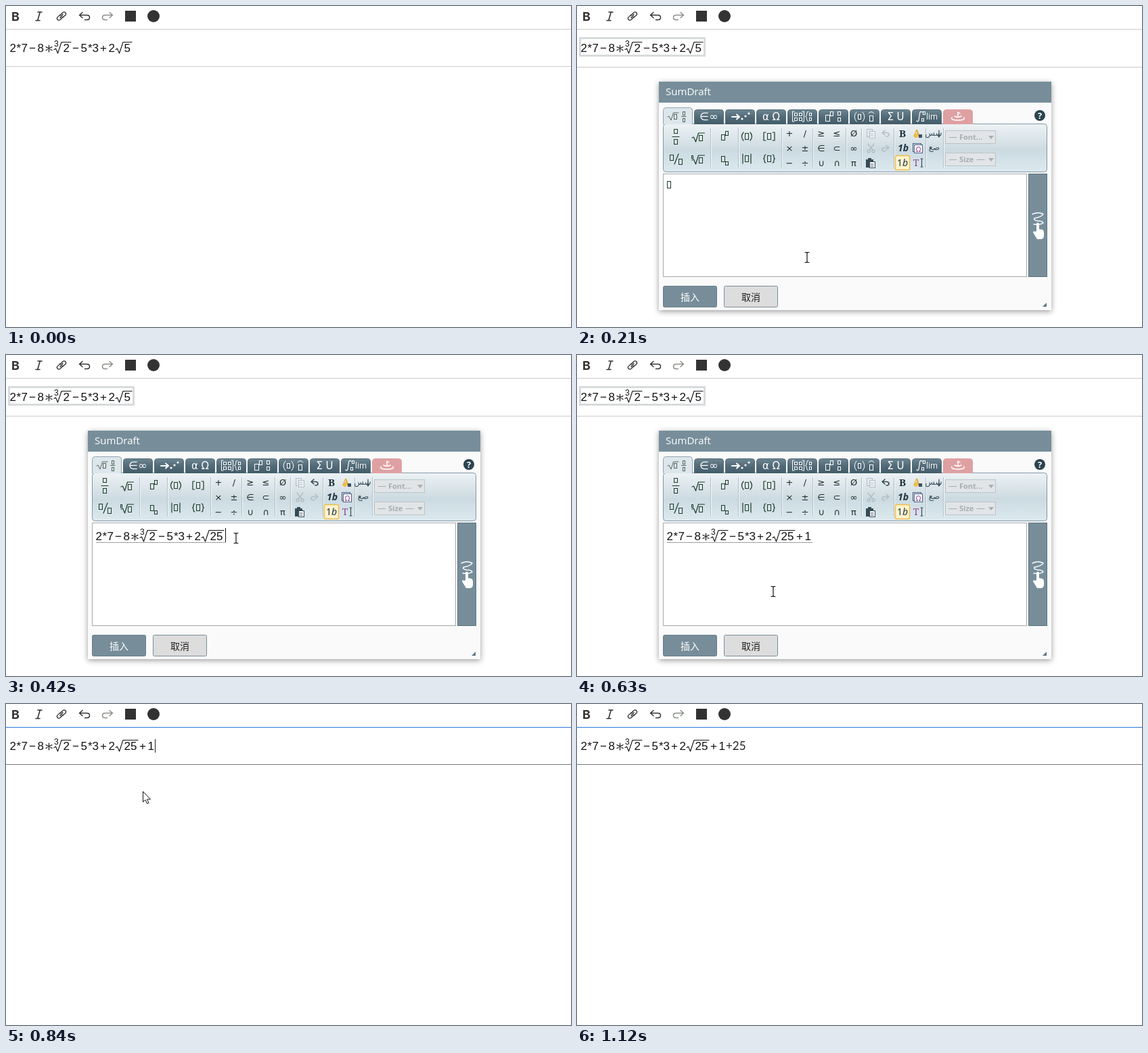
An HTML page that plays this animation: 835 by 475 pixels, repeating every 1190 ms.

```html
<!DOCTYPE html>
<html lang="en">
<head>
<meta charset="utf-8">
<title>Formula editor</title>
<style>
  html, body { margin: 0; width: 100%; height: 100%; overflow: hidden; background: #fff; }
  svg { display: block; width: 835px; height: 475px; }
  text { white-space: pre; }
  .line { fill: none; stroke-linecap: round; stroke-linejoin: round; }
  .math { font: 17px "Liberation Sans", Arial, sans-serif; fill: #111; }
  .sym { font-family: "DejaVu Sans", sans-serif; text-anchor: middle; }
  .ui { font-family: "Open Sans", sans-serif; }
  .cjk { font: 14px "Noto Sans CJK SC", "Noto Sans CJK", sans-serif; text-anchor: middle; }
</style>
</head>
<body>
<svg id="stage" viewBox="0 0 835 475" xmlns="http://www.w3.org/2000/svg"></svg>
<script>
const STEP = 70, STEPS = 17;
const stage = document.getElementById('stage');

// Markup helpers
const rect = (x, y, w, h, fill, extra = '') =>
  `<rect x="${x}" y="${y}" width="${w}" height="${h}" fill="${fill}" ${extra}/>`;
const frame = (x, y, w, h, stroke, fill = 'none', extra = '') =>
  rect(x + .5, y + .5, w - 1, h - 1, fill, `stroke="${stroke}" ${extra}`);
const line = (d, stroke = '#333', width = 1) =>
  `<path class="line" d="${d}" stroke="${stroke}" stroke-width="${width}"/>`;
const shape = (d, fill, stroke = 'none') => `<path d="${d}" fill="${fill}" stroke="${stroke}"/>`;
const text = (x, y, s, cls, size, fill, extra = '') =>
  `<text x="${x}" y="${y}" class="${cls}" font-size="${size}" fill="${fill}" ${extra}>${s}</text>`;
const sym = (x, y, s, size = 13, fill = '#1d2b24', extra = '') => text(x, y, s, 'sym', size, fill, extra);
const group = (id, content) => `<g id="${id}">${content}</g>`;
const move = (x, y, content) => `<g transform="translate(${x} ${y})">${content}</g>`;

const INK = '#1d3b28', SLATE = '#778e9a';
const box = (x, y, w = 5, h = 8, color = INK) => frame(x, y, w + 1, h + 1, color);

function toolbar() {
  const arrow = 'M4.5 0L0 4L4.5 8M.5 4H11Q15 4 15 7.5T11 11H8';
  return text(8, 21.5, 'B', '', 18, '#333', 'font-family="Inter, sans-serif" font-weight="700"') +
    line('M47 9H53M44 21.5H50M50.3 9L46.7 21.5', '#333', 1.6) +
    line('M80 14L83 10.5Q86 7.5 88 10T86 15L84 17M84 16L81 19.5Q78 22.5 76 20T78 15L80 13M80 17.5L84 12.5', '#333', 1.4) +
    move(108.5, 9.5, line(arrow, '#333', 1.5)) +
    `<g transform="translate(157.5 9.5) scale(-1 1)">${line(arrow, '#8a9088', 1.5)}</g>` +
    rect(176, 7, 16, 16, '#333') + '<circle cx="218" cy="15" r="9" fill="#333"/>';
}

function tabs() {
  const w = '#fff', icons = [
    line('M134 164l2-1l3 6l3.5-11H150', '#52665c') + box(143, 160, 4, 7, '#52665c') +
      box(156, 156, 3, 5, '#52665c') + line('M154.5 163.5H161', '#52665c') + box(156, 166, 3, 5, '#52665c'),
    sym(195, 169, '∈∞', 16, w),
    line('M229 164H239M236 160.5L240 164L236 167.5', w, 2) +
      [[244, 167], [249, 163], [254, 159]].map(([x, y]) => `<circle cx="${x}" cy="${y}" r="1.6" fill="#fff"/>`).join(''),
    sym(287, 169, 'α Ω', 15, w),
    line('M321 156H318.5V171H321M333 156H335.5V171H333M342 156Q339.5 156 339.5 160T337.5 163.5Q339.5 163.5 339.5 167T342 171', w) +
      [321, 328].map(x => box(x, 158, 4, 4, w) + box(x, 165, 4, 4, w)).join('') + box(343, 158, 3, 4, w) + box(343, 165, 3, 4, w),
    box(367, 161, 6, 9, w) + box(374, 156, 4, 6, w) + box(385, 156, 4, 5, w) + box(385, 165, 4, 5, w),
    line('M413 157Q407 164 413 171M422 157Q428 164 422 171M431 159Q435 154 439 159', w) + box(415, 160, 4, 7, w) + box(432, 162, 5, 8, w),
    sym(471, 169, 'Σ U', 15, w),
    line('M510 157Q507 155 506.5 159L505 169Q504 172 502 170', w, 1.2) + box(511, 156, 3, 4, w) + box(509, 166, 3, 4, w) +
      text(516, 168, 'lim', 'ui', 12, w),
    line('M554 165Q552 169 563 169T572 165M558 163Q563 166 568 163M563 163V157L566 159', w, 1.5)
  ];
  return icons.map((icon, i) => {
    const x = 127 + 46 * i, fill = i === 0 ? '#dce6eb' : i === 9 ? '#dfa0a2' : 'url(#tab)';
    const edge = i === 0 ? '#91a4ae' : i === 9 ? '#dfa0a2' : '#526b78';
    const top = i === 0 ? 150.5 : 153.5;
    return shape(`M${x + .5} 175V${top + 4}q0-4 4-4H${x + 39.5}q4 0 4 4V175`, fill, edge) + icon;
  }).join('');
}

function structures() {
  const root = (x, y) => line(`M${x} ${y}l2.5-1l3 7l4-13h9`, INK, 1.2) + box(x + 10, y - 4, 5, 8);
  const fences = (x, y, d) => box(x - 3, y - 5, 5, 9) + line(`M${x} ${y}${d}`, INK, 1.2);
  return box(143, 182, 5, 6) + line('M141 193.5H151', INK) + box(143, 197, 5, 7) +
    box(137, 220, 5, 8) + line('M144 234L150 219', INK, 1.2) + box(150, 226, 5, 8) +
    root(170, 195) + root(170, 228) + box(169, 221, 2, 4) +
    box(213, 190, 5, 8) + box(219, 185, 4, 6) + box(213, 222, 5, 8) + box(219, 230, 4, 5) +
    fences(251, 193, 'm-5-6q-5 6 0 12m10-12q5 6 0 12') +
    fences(284, 193, 'm-5-6h-3v12h3m10-12h3v12h-3') +
    fences(251, 226, 'm-6-7v14m12-14v14') +
    fences(284, 226, 'm-5-6q-2 0-2 3t-1.5 3q1.5 0 1.5 3t2 3m10-12q2 0 2 3t1.5 3q-1.5 0-1.5 3t-2 3');
}

function symbols() {
  const columns = { 314: '+×−', 337: '/±÷', 361: '≥∈∪', 384: '≤⊂∩', 409: 'Ø∞π' };
  return Object.entries(columns).map(([x, chars]) =>
    [...chars].map((c, i) => sym(x, [193, 215, 237][i], c)).join('')).join('');
}

function editTools() {
  const dim = '#b2bec4', dark = '#354b57';
  const bold = 'font-weight="700" style="font-family:\'Noto Serif\',serif"';
  const italic = 'font-style="italic" style="font-family:\'Noto Sans\',sans-serif"';
  return frame(428, 182, 9, 12, dim) + frame(432, 185, 9, 11, dim, '#eef2f4') + line('M434 189H438M434 192H438', dim) +
    line('M430 204L437 213M439 204L432 213', dim, 1.5) +
    `<g fill="none" stroke="${dim}" stroke-width="1.5"><circle cx="431" cy="215" r="2"/><circle cx="438" cy="215" r="2"/></g>` +
    rect(427, 227, 11, 12, dark) + rect(430, 225, 5, 3, dark) + frame(432, 230, 9, 10, dark, '#fff') + line('M434 234H438M434 237H438', dark) +
    group('undo', line('M455 184L451 187.5L455 191M451.5 187.5H458Q461 188 461 190.5T457 193', 'currentColor', 1.6)) +
    line('M457 206L461 209.5L457 213M460.5 209.5H454Q451 210 451 212.5T455 215', dim, 1.6) +
    rect(470.5, 221.5, 21, 21, '#fff3cf', 'rx="2" stroke="#f0bd4a" stroke-width="1.5"') +
    sym(481, 194, 'B', 15, '#1f3440', bold) +
    sym(482, 215, '1b', 14, '#1f3440', italic + ' font-weight="600"') +
    sym(481, 237, '1<tspan font-style="italic">b</tspan>', 14, '#1f3440', 'style="font-family:\'Noto Sans\',sans-serif"') +
    sym(502, 193, 'A', 14, '#e9a820', bold) + rect(505, 190, 5, 5, '#39525e') + rect(499, 190, 4, 5, '#f1bf45') +
    frame(496, 203, 13, 13, '#4b5e83') + frame(498, 205, 13, 13, '#4b5e83', '#fff') + sym(504.5, 216, 'Ω', 10, '#8d3e92') +
    sym(501, 237, 'T', 14, '#914b94', 'style="font-family:\'Noto Serif\',serif"') +
    line('M508 226H511M508 238H511M509.5 226V238', dark, 1.2) +
    sym(527, 192, 'سس', 12, dark) + line('M535 184V193M533 191L535 194L537 191', dark, 1.2) +
    sym(528, 213, 'صع', 12, dark);
}

function dropdown(y, label) {
  const grey = '#a7adb0';
  return frame(544, y, 75, 20, '#bcc3c7', '#e1e5e7') + line(`M550 ${y + 10.5}H561`, grey) +
    text(565, y + 14, label, 'ui', 11, grey, 'font-weight="700"') +
    (label === 'Size' ? line(`M591 ${y + 10.5}H602`, grey) : '') +
    shape(`M608 ${y + 8}h8l-4 5z`, grey);
}

function dialog() {
  const separators = [197, 238, 302, 348, 397, 420, 468, 515, 541]
    .map(x => rect(x, 181, 1, 58, '#afbfc8') + rect(x + 1, 181, 1, 58, '#f5f8f9')).join('');
  const hand = 'M679 333V322q2-3 4 0v8l5 1q2 1 2 4v5q0 5-5 5h-5l-6-10q0-3 3-1z';
  return rect(121, 112, 580, 338, '#fafafa', 'filter="url(#shadow)"') +
    rect(121, 112, 580, 31, SLATE) + text(131, 132, 'SumDraft', 'ui', 15, '#fff') +
    rect(127.5, 174.5, 567, 71, 'url(#ribbon)', 'rx="4" stroke="#8299a5"') +
    tabs() + separators + structures() + symbols() + editTools() +
    dropdown(184, 'Font...') + dropdown(217, 'Size') +
    '<circle cx="684" cy="162" r="8" fill="#2c4350"/>' + text(684, 167, '?', 'ui', 13, '#fff', 'font-weight="700" text-anchor="middle"') +
    frame(127, 248, 538, 153, '#a5a9ab', '#fff') +
    frame(667, 248, 28, 153, '#5c7480', SLATE) +
    line('M673 308Q682 304 689 308Q687 312 676 314Q674 317 681 318Q688 318 689 321Q686 324 675 323', '#fff', 1.5) + shape(hand, '#fff') +
    rect(127.5, 414.5, 79, 31, SLATE, 'id="insert" rx="2"') + text(167, 436, '插入', 'cjk', 14, '#fff') +
    rect(217.5, 414.5, 79, 31, '#ddd', 'rx="2" stroke="#778e9a"') + text(257, 436, '取消', 'cjk', 14, '#222') +
    shape('M694 439V445H688z', '#5d7785') + group('draft', '');
}

// The expression shares one layout in the page and in the dialog.
function formula(radicand, tail) {
  const glyphs = [['2', 5.5], ['*', 15.5], ['7', 22.5], ['−', 34], ['8', 46.5], ['2', 84.5], ['−', 98],
    ['5', 110.5], ['*', 121], ['3', 127.5], ['+', 139], ['2', 151.5], [radicand, 174.5]];
  const end = radicand.length > 1 ? 195 : 186;
  [...tail].forEach((c, i) => glyphs.push([c, [197, 209.5][i]]));
  const root = (x, right) => line(`M${x} 64.5L${x + 2.5} 63L${x + 5.5} 70L${x + 11} 53.5H${right}`, '#111', 1.1);
  return `<g class="math">${glyphs.map(([c, x]) => `<text x="${x}" y="68">${c}</text>`).join('')}` +
    `<text x="71" y="60" font-size="12">3</text></g>` + root(71, 96) + root(162, end) +
    line('M63.5 58V68M59 60.5L68 65.5M59 65.5L68 60.5', '#111', 1.2);
}

const cursors = {
  arrow: shape('M.5 .5V16L4 12.8L6.5 18.5L9 17.4L6.6 12H11.5z', '#fff', '#111'),
  beam: line('M-3 -7.5H-1L0 -6.5L1 -7.5H3M0 -6.5V6.5M-3 7.5H-1L0 6.5L1 7.5H3', '#111', 1.2),
  hand: shape('M-2 11V1q2-3 4 0V8q2-2 4 0q2-1 3 1q3-1 3 2v6q0 3-2 7H0l-6-9q-1-4 4-1z', '#fff', '#111')
};

stage.innerHTML = `<defs>
  <linearGradient id="tab" x2="0" y2="1"><stop stop-color="#6d8592"/><stop offset=".5" stop-color="#536b78"/><stop offset="1" stop-color="#435c69"/></linearGradient>
  <linearGradient id="ribbon" x2="0" y2="1"><stop stop-color="#edf2f4"/><stop offset=".55" stop-color="#ccdae1"/><stop offset="1" stop-color="#dceaf0"/></linearGradient>
  <filter id="shadow" x="-5%" y="-5%" width="110%" height="112%"><feDropShadow dx="0" dy="2" stdDeviation="4" flood-opacity=".4"/></filter>
  </defs>` + toolbar() + group('page', '') + group('dialog', dialog()) + group('pointer', '');

const [page, dialogBox, draft, undo, insert, pointer] =
  ['page', 'dialog', 'draft', 'undo', 'insert', 'pointer'].map(id => document.getElementById(id));

const OPEN = 3, CLOSED = 12;

function pagePart(step) {
  const closed = step >= CLOSED, open = step >= OPEN && !closed;
  const selected = step >= 2 && !closed, focused = step === 2 || closed;
  const typed = '+25'.slice(0, Math.max(0, step - 13));
  const caretX = [220.5, 230.5, 240.5][Math.max(0, step - 13)];
  const showCaret = step === 12 || step === 14 || step === 15;
  return rect(0, 34, 835, 1, focused ? '#3b82e0' : '#ccc') +
    (focused ? rect(0, 35, 835, 1, '#dce8f8') : '') +
    rect(0, selected ? 90 : 89, 835, 1, closed ? '#75787d' : focused ? '#3b82e0' : '#ccc') +
    (selected ? rect(4.5, 47.5, 184, 26, 'none', `stroke="${open ? '#d8dbdd' : '#8499a1'}" stroke-width="3"`) : '') +
    formula(closed ? '25' : '5', closed ? '+1' : '') +
    text(220, 68, typed, '', 17, '#222', 'font-family="Lato, sans-serif"') +
    (showCaret ? rect(caretX - .5, 52, 1, 20, '#222') : '');
}

function draftPart(step) {
  if (step === OPEN) return box(133, 259, 5, 10);
  const tail = '+1'.slice(0, Math.max(0, step - 6));
  const caretX = [302, 302, 324, 337, 348, 348][step - 4];
  const lineEnd = step < 6 ? 314 : caretX;
  return (step < 11 ? rect(133, 277, lineEnd - 133, 1, '#a39aa8') : '') +
    move(127, 206, formula(step < 6 ? '5' : '25', tail)) +
    (step < 10 && step !== 9 ? rect(caretX, 256, 1, 21, '#111') : '');
}

function pointerPart(step) {
  const places = {
    1: ['arrow', 176, 72], 2: ['arrow', 172, 65], 3: ['beam', 340, 372], 4: ['beam', 340, 372],
    5: ['beam', 340, 271], 6: ['beam', 340, 271], 7: ['beam', 340, 271], 8: ['beam', 340, 271],
    9: ['beam', 290, 350], 10: ['hand', 180, 425], 11: ['hand', 175, 422], 12: ['arrow', 202, 129]
  };
  if (!places[step]) return '';
  const [kind, x, y] = places[step];
  const halo = step === 2 ? '<circle cx="173" cy="65.5" r="11.5" fill="#ff0" fill-opacity=".5"/>' : '';
  return halo + move(x, y, cursors[kind]);
}

let shown = -1;
function render(time) {
  const step = Math.floor(time / STEP) % STEPS;
  if (step !== shown) {
    shown = step;
    const open = step >= OPEN && step < CLOSED;
    page.innerHTML = pagePart(step);
    dialogBox.style.display = open ? '' : 'none';
    if (open) draft.innerHTML = draftPart(step);
    undo.style.color = step < 6 ? '#b2bec4' : '#354b57';
    insert.setAttribute('stroke', step === 11 ? '#111' : '#667e8a');
    insert.setAttribute('stroke-width', step === 11 ? 2 : 1);
    pointer.innerHTML = pointerPart(step);
  }
}

const start = performance.now();
function tick() {
  render(performance.now() - start);
  requestAnimationFrame(tick);
}
tick();
</script>
</body>
</html>
```
